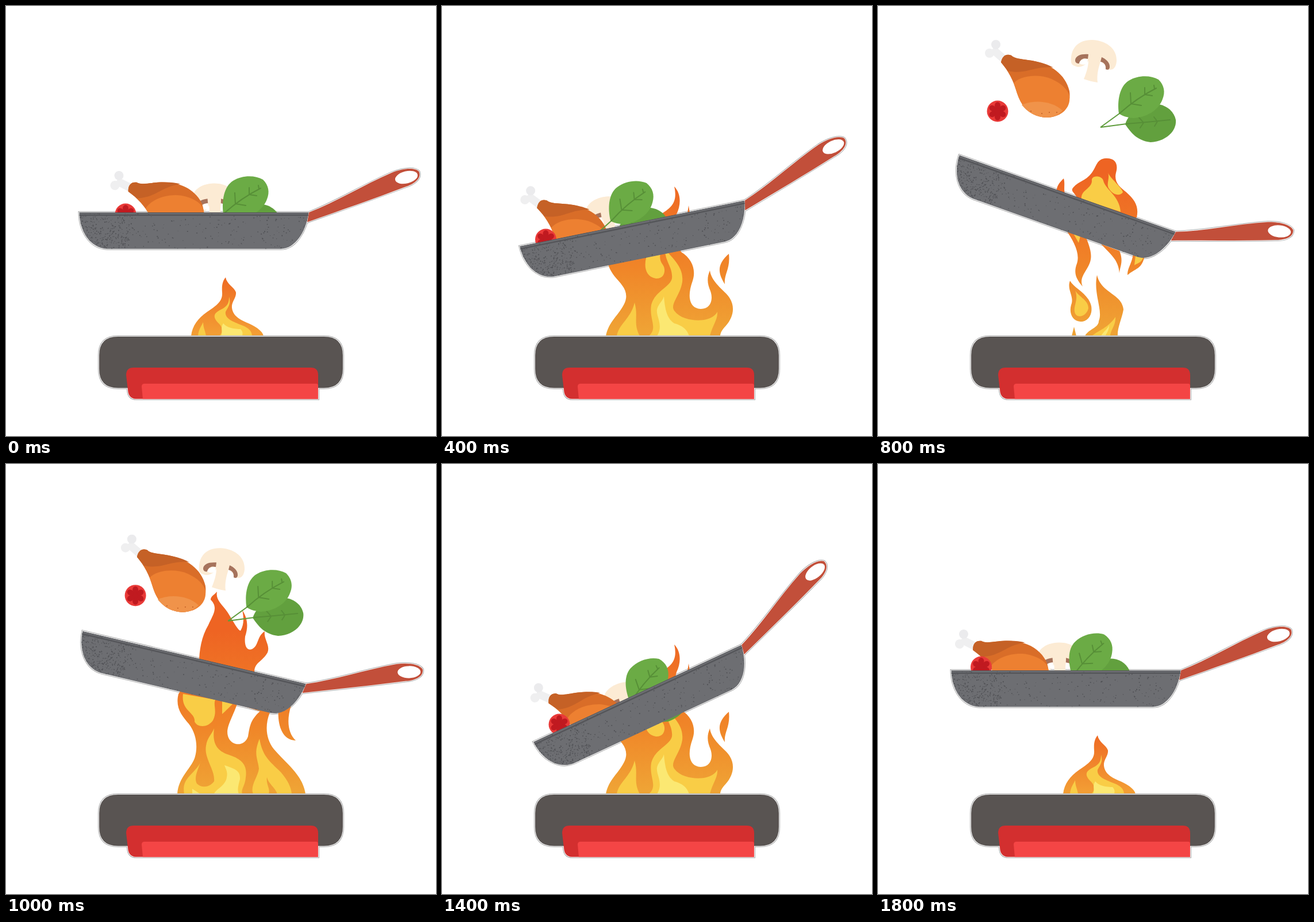
Write an HTML page that moves like this. It is 748 px wide and 748 px high and loops after 1.91 s.

```html
<!DOCTYPE html>
<html lang="en">
<head>
<meta charset="utf-8">
<title>Frying pan toss</title>
<style>
html, body { margin: 0; width: 100%; height: 100%; overflow: hidden; background: #fff; }
svg { display: block; width: 100vw; height: 100vh; }
.hot { fill: url(#heat); fill-rule: evenodd; }
.mid { fill: #f9cd46; }
.core { fill: #fbe872; }
.vein { fill: none; stroke: #578f37; stroke-width: 2; stroke-linecap: round; }
.rim { stroke: #a8a8a8; stroke-width: 4; }
.gap { stroke: #fff; stroke-width: 2; }
</style>
</head>
<body>
<svg viewBox="0 0 748 748">
  <defs>
    <linearGradient id="heat" gradientUnits="userSpaceOnUse" x1="0" y1="290" x2="0" y2="574">
      <stop offset="0" stop-color="#ee6423"/>
      <stop offset=".58" stop-color="#f08528"/>
      <stop offset="1" stop-color="#efa536"/>
    </linearGradient>
    <linearGradient id="heatLow" gradientUnits="userSpaceOnUse" x1="0" y1="472" x2="0" y2="574">
      <stop offset="0" stop-color="#ee6a23"/>
      <stop offset="1" stop-color="#f3a035"/>
    </linearGradient>
    <path id="bowl" d="M127.500 359H526.500C523 390 504 422.500 478 422.500H176C146 421 128 392 127.500 359Z"/>
    <path id="handle" d="M527 359C574 341 620 312 672 289.500C690 282.500 711 280 718.500 288C724 301 707 311 695 314.500C640 335.500 580 356 524 376Z"/>
    <path id="stove" d="M195 575H553Q586 575 586 608V631Q586 664.500 553 664.500H195Q162 664.500 162 631V608Q162 575 195 575Z"/>
    <path id="base" d="M209 642Q209 629 222 629H530Q543 629 543 642V683.500H226Q213 683 212 668Z"/>
    <clipPath id="bowlClip"><use href="#bowl"/></clipPath>
  </defs>

  <!-- thin grey rim with a white gap, under everything -->
  <g class="pan">
    <use href="#bowl" class="rim"/><use href="#handle" class="rim"/>
    <use href="#bowl" class="gap"/><use href="#handle" class="gap"/>
  </g>

  <g id="flames"></g>

  <g class="mushroom">
    <path fill="#fcebd4" d="M336 98C334 72 350 58 374 59C400 61 416 76 415 96C414 108 408 113 400 110C394 108 390 100 388 94C384 105 380 120 382 133C374 132 366 130 358 127C362 118 366 105 366 95C362 104 350 108 344 105C339 103 337 102 336 98Z"/>
    <path fill="#a6735c" d="M343 94C344 86 354 83 366 84L365 92C358 90 352 92 350 100C345 100 343 98 343 94ZM389 89C396 92 404 98 403 107C402 112 398 111 396 110C397 102 393 98 387 97Z"/>
    <path fill="#fff" d="M350 100Q352 91 365 92L364 100Q358 104 350 100ZM387 97Q396 100 396 109Q389 108 386 102Z"/>
  </g>

  <g class="chicken">
    <path fill="none" stroke="#efeff0" stroke-width="14" d="M199 75L221 94"/>
    <circle cx="194" cy="82" r="8" fill="#efeff0"/>
    <circle cx="205" cy="67" r="8" fill="#ebebed"/>
    <path fill="#d96d28" d="M214 98C216 88 222 82 232 86C236 92 250 92 268 95C300 101 326 118 333 148C337 176 318 194 292 194C264 192 250 176 242 152C236 130 226 112 214 98Z"/>
    <path fill="#c56126" d="M214 98C216 88 222 82 232 86C238 92 250 92 268 95C284 98 296 102 305 107C270 104 258 120 226 113Z"/>
    <path fill="#ed8031" d="M236 134C250 120 280 118 302 127C320 135 330 146 333 156C336 178 318 194 292 194C264 192 250 176 242 152Z"/>
    <path fill="#f0934a" d="M250 172C270 163 302 164 321 182C312 191 304 194 292 194C272 192 260 184 250 172Z"/>
    <path fill="none" stroke="#c56126" stroke-width="2" stroke-linecap="round" d="M266 183h.1M285 187h.1M298 185h.1M311 185h.1"/>
  </g>

  <g class="leaves">
    <path fill="none" stroke="#5f9c3c" stroke-width="2" d="M387 211L420 187M387 211L432 205"/>
    <path fill="#62a03e" d="M430 206C434 190 450 178 470 172C492 166 514 178 518 198C520 218 500 236 474 237C450 234 440 220 430 206Z"/>
    <path class="vein" d="M432 205Q470 202 508 198M462 203l-8-9M462 203l-6 9M486 201l-6-8M486 201l-5 8"/>
    <path fill="#6bab45" d="M419 187C416 165 420 140 436 130C452 120 474 120 488 128C498 138 500 150 495 162C488 182 466 194 444 195C434 194 426 192 419 187Z"/>
    <path class="vein" d="M420 187Q450 160 484 143M440 170l-1-19M440 170l18 3M464 154l0-12M464 154l13 2M481 144l-1-6"/>
  </g>

  <g class="tomato">
    <circle r="18.500" fill="#e93a38"/>
    <g id="seeds" fill="#c01a20"><circle r="7"/></g>
  </g>

  <g class="pan">
    <use href="#handle" fill="#c24f3a"/>
    <ellipse cx="696.500" cy="298" rx="20" ry="10.500" transform="rotate(-14 696.500 298)" fill="#fff"/>
    <g clip-path="url(#bowlClip)">
      <path fill="#6d6e72" d="M120 350H540V430H120Z"/>
      <path id="specks" fill="#505155"/>
      <path fill="#55565a" d="M120 357H540V360H120ZM120 362.500H540V365H120Z"/>
    </g>
  </g>

  <use href="#stove" class="rim"/><use href="#base" class="rim"/>
  <use href="#stove" class="gap"/><use href="#base" class="gap"/>
  <use href="#stove" fill="#595452"/>
  <use href="#base" fill="#d32f2f"/>
  <path fill="#f44545" d="M236 662Q236 657 241 657H540Q543 657 543 661V683.500H238Z"/>
</svg>
<script>
const $ = id => document.getElementById(id);

// Each pose: outer fire, yellow tongues, pale core.
const poses = {
  A: [
    'M322 574C324 556 334 543 350 532C368 520 377 513 376 498C375 486 377 478 382 472C384 484 397 489 400 498C401 508 392 514 393 525C395 541 410 547 424 553C438 560 446 566 448 574Z',
    'M371 574C378 567 378 560 370 552C358 540 362 534 374 528C386 522 388 516 388 506C392 518 386 524 382 532C380 545 398 550 412 556C422 560 428 566 428 574ZM334 574C335 562 340 557 343 550C343 560 347 566 348 574Z',
    'M374 574C378 566 372 560 378 552C384 560 398 562 408 562C412 566 412 570 411 574Z'
  ],
  B: [
    'M304 574C308 558 320 548 334 538C350 526 350 510 344 494C338 476 340 456 352 440L362 425L405 415C412 430 404 446 412 460C420 476 440 480 455 492C472 506 474 524 466 544C458 560 454 566 454 574ZM440 463C428 458 420 444 424 424L456 415C444 428 436 442 440 463Z',
    'M382 454C364 470 360 500 372 510C384 520 398 510 397 496C394 484 380 478 382 454ZM398 432C384 458 392 476 410 486C440 498 458 506 450 530C446 548 436 558 436 574H374C368 548 376 536 392 528C410 520 414 512 408 498C390 484 384 460 398 432ZM328 574C332 568 338 566 340 558C342 564 346 570 348 574Z',
    'M383 574C380 556 388 546 400 542C414 538 424 532 428 525C430 544 414 552 416 574Z'
  ],
  C: [
    'M285 574C290 548 308 538 318 516C326 496 312 484 300 470C288 454 284 440 293 424H300C306 438 316 444 326 443C338 441 344 434 346 420C352 400 370 375 384 360C400 350 410 340 404 314C416 326 416 346 408 362C404 376 404 400 416 428C436 440 442 460 436 478C426 505 430 526 450 527C468 527 472 510 467 496C462 484 460 474 466 460C468 476 482 488 494 500C512 518 508 540 494 556C486 564 484 570 484 574ZM499 431C480 448 478 462 492 484C490 466 502 458 499 431ZM429 347L431 360H427Z',
    'M360 424C350 445 350 470 372 474C388 475 390 458 384 450C378 442 378 434 382 424ZM388 424C410 446 420 460 418 480C414 505 396 518 404 530C416 546 440 548 456 546C468 544 476 538 479 532C480 546 470 556 466 574H360C376 560 360 545 364 520C370 496 396 490 400 474C402 455 388 445 388 424ZM304 574C308 552 328 545 335 516C342 540 332 552 344 574Z',
    'M374 574C386 556 372 540 374 528C376 518 384 514 386 505C388 530 392 544 404 552C418 556 426 562 430 574Z'
  ],
  D: [
    'M298 574C300 545 320 532 328 512C334 494 332 470 318 452C306 438 294 424 300 400L336 345C336 325 340 300 352 280C360 262 370 250 356 236C356 230 362 228 367 222C364 238 378 245 388 262C396 275 404 290 408 290C414 280 414 268 411 254C420 268 422 282 416 300C414 318 420 325 428 322C440 316 436 300 450 291C448 305 460 315 455 328C445 345 432 345 432 362L470 425L459 432C450 455 452 478 466 496C486 520 516 540 521 574ZM402 418L442 430C424 446 424 458 421 474C416 490 396 492 388 478C380 462 390 450 402 418ZM474 425C472 450 478 480 504 481C490 468 488 445 496 420Z',
    'M308 400C304 430 330 432 328 448C332 458 350 460 360 446C368 430 360 420 364 410ZM376 412L394 418C386 425 382 430 376 435ZM310 574C306 552 318 545 328 533C334 527 338 521 339 516C335 530 326 545 332 556C340 564 354 563 362 552C364 532 344 512 348 490C350 476 358 470 362 460C358 490 370 500 388 506C412 514 420 525 417 545C416 560 408 566 411 574ZM430 574C424 560 438 545 440 530C438 512 430 505 441 478C446 510 462 520 478 536C490 550 496 562 497 574H472C468 562 456 556 454 545C452 558 460 564 457 574Z',
    'M324 574V565L338 574ZM362 574C364 566 382 560 384 545C386 535 382 530 380 524C396 530 408 532 407 548C404 560 402 566 405 574Z'
  ],
  E: [
    'M338 318C348 304 360 306 372 290C380 280 380 266 396 265C414 264 418 276 414 290C410 306 420 315 432 324C448 338 454 350 450 368L430 375L350 345C346 325 336 325 338 318ZM323 300C308 314 312 320 310 325L326 332C322 318 326 310 323 300ZM326 388L362 403C374 432 372 442 364 456C354 472 352 478 356 488C344 474 340 464 346 448C352 430 340 408 326 388ZM388 414L420 426C428 445 420 455 420 465C418 440 404 432 388 414ZM444 430L464 433C460 458 448 456 434 468C434 455 442 448 444 430ZM334 478C342 492 366 500 371 522C374 540 362 550 352 549C338 548 332 534 336 520C342 505 328 494 334 478ZM381 468C388 500 424 500 427 528C424 545 416 560 417 574H360C366 562 384 560 384 548C392 530 374 500 381 468ZM337 574L341 558L345 574Z',
    'M354 336C352 320 372 318 372 304C370 294 390 294 392 304C396 320 420 330 422 358ZM400 290C404 300 424 315 426 324C420 332 408 328 402 318C396 310 404 300 400 290ZM340 396L352 400L349 412ZM448 434H462C460 446 454 446 446 451ZM342 492C346 505 366 510 366 526C362 542 344 544 342 532C340 520 350 510 342 492ZM372 574C384 564 400 560 413 541C414 556 404 564 404 574Z',
    'M388 574C392 566 400 562 402 555C402 566 396 570 396 574Z'
  ]
};
const order = 'AABBCCDDEEDDCCCBBAA';

for (const key in poses) {
  const [hot, mid, core] = poses[key];
  const low = key === 'A' ? ' style="fill:url(#heatLow)"' : '';
  $('flames').innerHTML += `<g id="fire${key}"><path class="hot"${low} d="${hot}"/>` +
    `<path class="mid" d="${mid}"/><path class="core" d="${core}"/></g>`;
}

for (let i = 0; i < 6; i++) {
  $('seeds').innerHTML += `<ellipse cx="10" rx="6" ry="5" transform="rotate(${i * 60 + 30})"/>`;
}

// Stone coating: dense on the left, sparse elsewhere.
let seed = 7;
const rand = () => (seed = seed * 16807 % 2147483647) / 2147483647;
let dots = '';
for (let i = 0; i < 560; i++) {
  const x = i < 340 ? 126 + 90 * rand() ** 1.3 : 140 + 385 * rand();
  const y = 361 + 61 * rand(), s = .8 + 1.1 * rand();
  dots += `M${x.toFixed(1)} ${y.toFixed(1)}h${s.toFixed(1)}v${s.toFixed(1)}h-${s.toFixed(1)}z`;
}
$('specks').setAttribute('d', dots);

// Rows: times in ticks of 100 ms, then x, y and turn at those times.
const keys = [0, 3, 4, 6, 8, 12, 14, 16, 18];
const parts = [
  { name: 'chicken', pivot: [222, 94], tracks: [
    [219.5, 164, 173, 188, 222, 242, 192, 181, 172],
    [317, 382, 347, 210, 94, 275.5, 410, 379, 318],
    [-14, -9, -4, 0, 0, 0, -17, -15, -14]] },
  { name: 'tomato', pivot: [0, 0], tracks: [
    [208, 173, 180.5, 173, 208, 233, 204, 188, 179.5],
    [362, 428, 406, 281, 183, 319.5, 453, 417, 353],
    [0, 0, 0, 0, 0, 0, 0, 0, 0]] },
  { name: 'mushroom', pivot: [376, 92], tracks: [
    [362, 284, 288, 321.5, 376, 376, 320, 308, 315],
    [341, 392, 364, 194, 92, 318, 412, 398, 343],
    [-12, -20, -18, 0, 0, 0, -22, -18, -12]] },
  { name: 'leaves', pivot: [458, 162], tracks: [
    [417, 322, 329.5, 364, 458, 455, 358, 346, 371],
    [336, 366, 345, 282, 162, 320, 380, 372, 336],
    [0, -10, -6, 0, 0, 0, -16, -13, -12]] },
  { name: 'pan', pivot: [424, 350], tracks: [
    [424, 424, 424, 424, 424, 424, 424, 424, 424],
    [350, 350, 350, 350, 350, 350, 350, 350, 350],
    [0, -18, -11.5, 10.6, 19.5, 0, -25, -15, 0]] }
];
for (const part of parts) part.nodes = document.querySelectorAll('.' + part.name);

// Monotone cubic through the keys: flat at every turning point.
function sample(v, t) {
  let i = 0;
  while (i < keys.length - 2 && t >= keys[i + 1]) i++;
  const slope = j => (v[j + 1] - v[j]) / (keys[j + 1] - keys[j]);
  const tangent = j => {
    if (j === 0 || j === keys.length - 1) return 0;
    const a = slope(j - 1), b = slope(j);
    return a * b <= 0 ? 0 : 2 * a * b / (a + b);
  };
  const h = keys[i + 1] - keys[i], u = (t - keys[i]) / h, w = 1 - u;
  return w * w * (1 + 2 * u) * v[i] + u * u * (3 - 2 * u) * v[i + 1]
    + h * u * w * (w * tangent(i) - u * tangent(i + 1));
}

let shown = -1;
function draw(tick) {
  for (const { nodes, pivot, tracks } of parts) {
    const [x, y, turn] = tracks.map(v => sample(v, tick));
    for (const node of nodes) {
      node.setAttribute('transform',
        `translate(${x} ${y}) rotate(${turn}) translate(${-pivot[0]} ${-pivot[1]})`);
    }
  }
  for (const key in poses) $('fire' + key).style.display = key === order[tick] ? '' : 'none';
  const grow = tick === 1 || tick === 17 ? 1.3 : 1;
  $('flames').setAttribute('transform', `translate(0 574) scale(1 ${grow}) translate(0 -574)`);
}

function loop() {
  const tick = Math.min(18, Math.floor(performance.now() % 1910 / 100));
  if (tick !== shown) draw(shown = tick);
  requestAnimationFrame(loop);
}
loop();
</script>
</body>
</html>
```
